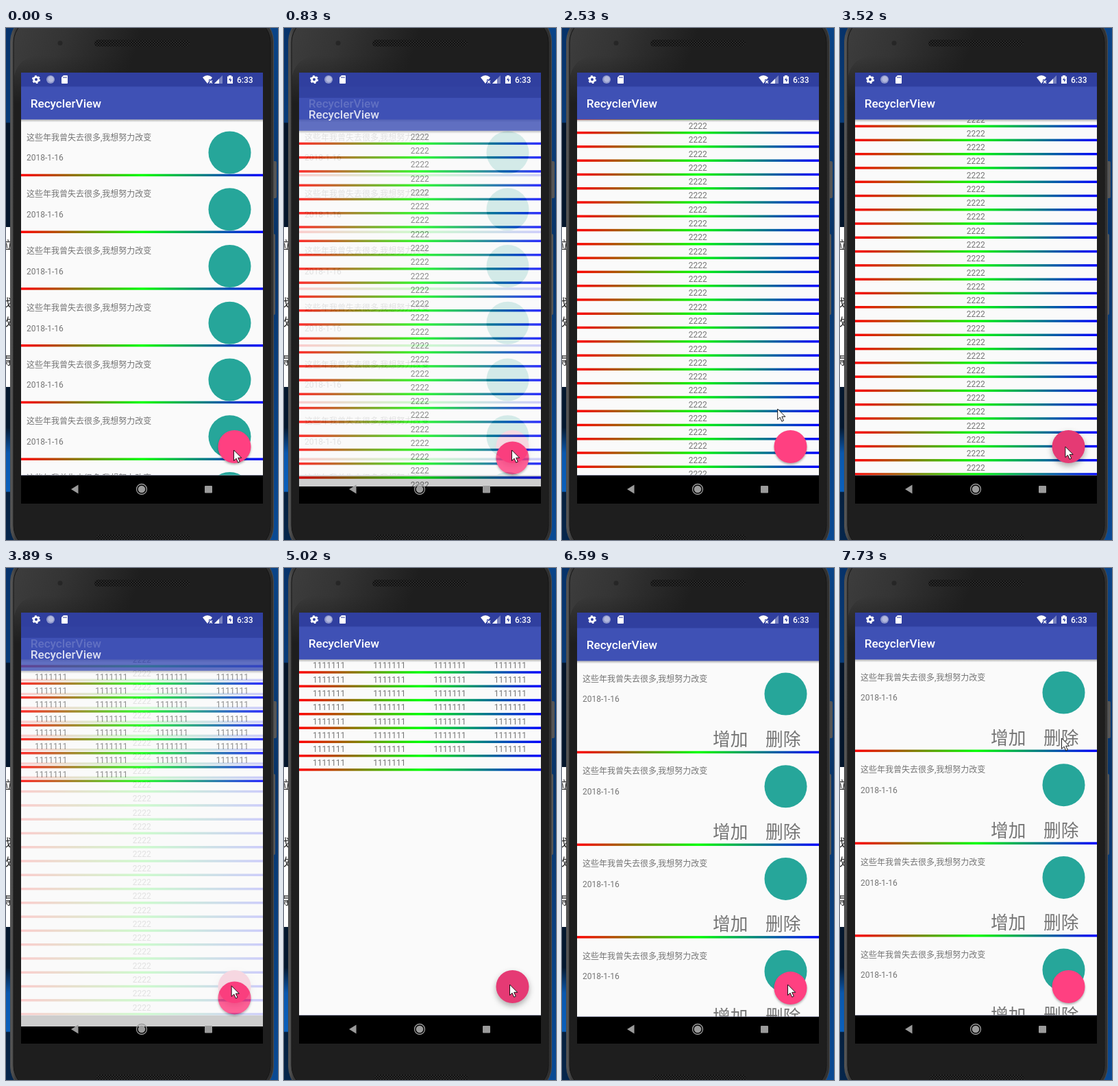
Write an HTML page that moves like this. It is 397 px wide and 746 px high and loops after 8000 ms.

```html
<!DOCTYPE html>
<html lang="zh">
<head>
<meta charset="utf-8">
<title>RecyclerView</title>
<style>
html, body { margin: 0; width: 100%; height: 100%; overflow: hidden; background: #06182e; }
svg { display: block; width: 397px; height: 746px; }
text { font-family: Roboto, "Noto Sans CJK SC", "Noto Sans CJK", sans-serif; }
.cell { font-size: 12px; fill: #757575; }
.big { font-size: 25.7px; fill: #757575; }
.mid { text-anchor: middle; }
</style>
</head>
<body>
<svg viewBox="0 0 397 746" xmlns="http://www.w3.org/2000/svg">
  <defs>
    <linearGradient id="rainbow" gradientUnits="userSpaceOnUse" x1="22" x2="375" y1="0" y2="0">
      <stop offset="0" stop-color="#f00"/><stop offset=".5" stop-color="#0f0"/><stop offset="1" stop-color="#00f"/>
    </linearGradient>
    <linearGradient id="shade" x1="0" x2="0" y1="0" y2="1">
      <stop offset="0" stop-opacity=".28"/><stop offset="1" stop-opacity="0"/>
    </linearGradient>
    <linearGradient id="deskLeft" x1="0" x2="0" y1="0" y2="1">
      <stop offset="0" stop-color="#06326a"/><stop offset=".184" stop-color="#083c7a"/>
      <stop offset=".186" stop-color="#04152a"/><stop offset=".78" stop-color="#04182f"/>
      <stop offset=".83" stop-color="#0a58ae"/><stop offset=".905" stop-color="#0a60bc"/>
      <stop offset=".907" stop-color="#05203f"/><stop offset="1" stop-color="#06264c"/>
    </linearGradient>
    <linearGradient id="deskRight" x1="0" x2="0" y1="0" y2="1">
      <stop offset="0" stop-color="#0a4488"/><stop offset=".4" stop-color="#083468"/>
      <stop offset="1" stop-color="#0a4a94"/>
    </linearGradient>
    <linearGradient id="rim" x1="0" x2="1" y1="0" y2="0">
      <stop offset="0" stop-color="#5a5a5a"/><stop offset=".02" stop-color="#3a3a3a"/>
      <stop offset="1" stop-color="#303030"/>
    </linearGradient>
    <linearGradient id="body" gradientUnits="userSpaceOnUse" x1="12" y1="0" x2="180" y2="60">
      <stop offset="0" stop-color="#3d3d3d"/><stop offset=".4" stop-color="#343434"/>
      <stop offset="1" stop-color="#1e1e1e"/>
    </linearGradient>
    <linearGradient id="fade" gradientUnits="userSpaceOnUse" x1="0" y1="40" x2="0" y2="110">
      <stop offset="0" stop-color="#1e1e1e" stop-opacity="0"/><stop offset="1" stop-color="#1e1e1e"/>
    </linearGradient>
    <pattern id="mesh" width="4" height="4" patternUnits="userSpaceOnUse">
      <rect width="4" height="4" fill="#111"/><path d="M0 0h2v2h-2zM2 2h2v2h-2z" fill="#292929"/>
    </pattern>
    <clipPath id="screen"><rect x="22" y="65" width="353" height="628"/></clipPath>
    <clipPath id="list"><rect x="22" y="133.4" width="353" height="518.2"/></clipPath>
  </defs>

  <rect width="200" height="746" fill="url(#deskLeft)"/>
  <rect x="200" width="197" height="746" fill="url(#deskRight)"/>
  <rect y="290" width="12" height="233" fill="#fff"/>
  <g font-size="16" text-anchor="end" fill="#222">
    <text x="9" y="322">位</text><text x="9" y="406">找</text>
    <text x="9" y="434">改</text><text x="9" y="490">得</text>
  </g>
  <g fill="#555">
    <rect x="389" y="194" width="6" height="54" rx="2"/>
    <rect x="389" y="300" width="4" height="118" rx="2"/>
  </g>
  <rect x="6.5" y="-20" width="384" height="786" rx="40" fill="url(#rim)" stroke="#4c4c4c"/>
  <rect x="11" y="-15" width="375" height="776" rx="36" fill="url(#body)" stroke="#151515"/>
  <rect x="11.500" y="40" width="374" height="720" rx="36" fill="url(#fade)"/>
  <circle cx="79" cy="22" r="3.5" fill="#262626"/>
  <rect x="129" y="17" width="139" height="10" rx="5" fill="url(#mesh)"/>
  <rect x="131" y="738" width="138" height="12" rx="5" fill="url(#mesh)"/>

  <g clip-path="url(#screen)">
    <rect x="22" y="65" width="353" height="628"/>
    <g id="windows"></g>
    <g fill="#fff">
      <circle cx="44" cy="75" r="3.4" fill="none" stroke="#fff" stroke-width="2.800"/>
      <circle cx="44" cy="75" r="5.200" fill="none" stroke="#fff" stroke-width="1.800" stroke-dasharray="2.72 2.72"/>
      <circle cx="65" cy="75" r="6" fill="#8f98cc"/>
      <circle cx="65.500" cy="74.500" r="4.200" fill="#b3b9dd"/>
      <path d="M84 69h5q1 0 1 1v10q0 1-1 1h-7q-1 0-1-1v-8z"/>
      <path d="M84 71v2M86 71v2M88 71v2" stroke="#303f9f"/>
      <path d="M287 72q7-6 14 0l-2 3h-3v3l-2 3z"/>
      <path d="M297 76.500l4 4m0-4l-4 4" stroke="#fff" stroke-width="1.300"/>
      <path d="M304 81l12-12v12z" opacity=".35"/>
      <path d="M304 81l7-7v7z"/>
      <path d="M325 69h4v1.500h2v10.500h-8v-10.500h2z"/>
      <path d="M327.500 72l-2.500 4h2v3l2.500-4h-2z" fill="#303f9f"/>
      <text x="337" y="79.800" font-size="12" font-weight="500">6:33</text>
    </g>
    <g fill="#9b9b9b">
      <path d="M95 672l10.500-6.500v13z"/>
      <circle cx="198" cy="672" r="7.500" fill="none" stroke="#9b9b9b" stroke-width="1.300"/>
      <circle cx="198" cy="672" r="5.300"/>
      <rect x="290" y="667" width="11" height="10.500" rx="1"/>
    </g>
  </g>
  <path id="cursor" d="M0 0V15.500L3.600 12.200L6.200 18.200L8.800 17L6.200 11.300H11.200Z" fill="#fff" stroke="#000" stroke-width=".9"/>
</svg>
<script>
const LOOP = 8000, STEP = 140;
const TOP = 133.4, LINE = 3.43, ROW = 20.28;
const $ = id => document.getElementById(id);
const repeat = (n, draw) => Array.from({ length: n }, (_, i) => draw(i)).join('');
const clamp = v => Math.min(1, Math.max(0, v));
const snap = (ms, step = STEP) => Math.floor(ms / step) * step;

const label = (x, y, str, cls = 'cell') => `<text x="${x}" y="${y}" class="${cls}">${str}</text>`;
const icon = (x, y) => `<circle cx="${x}" cy="${y}" r="31" fill="#26a69a"/>`;
const divider = bottom => `<rect x="22" y="${bottom - LINE}" width="353" height="${LINE}" fill="url(#rainbow)"/>`;

const card = (y, height) =>
  label(30, y + 30.2, '这些年我曾失去很多,我想努力改变') +
  label(30, y + 59.9, '2018-1-16') + icon(326.5, y + 48.1) + divider(y + height);

const lists = [
  repeat(7, i => card(TOP + i * 82.75, 82.75)),
  repeat(30, i => label(198.3, TOP + i * ROW + 13, '2222', 'cell mid') + divider(TOP + (i + 1) * ROW)),
  repeat(30, i => label(65.7 + i % 4 * 88.25, TOP + Math.floor(i / 4) * ROW + 13, '1111111', 'cell mid')) +
    repeat(8, i => divider(TOP + (i + 1) * ROW)),
  repeat(18, i => icon(i % 2 ? 286.3 : 110, TOP + 30.7 + Math.floor(i / 2) * 61.9)),
  repeat(4, i => {
    const y = TOP + i * 134.7;
    return card(y, 134.7) + label(220, y + 123.6, '增加', 'big') + label(297, y + 123.6, '删除', 'big');
  })
];

$('windows').innerHTML = lists.map(list => `<g class="window">
  <rect x="22" y="65" width="353" height="587" fill="#303f9f"/>
  <rect x="22" y="85.400" width="353" height="49" fill="#3f51b5"/>
  <rect x="22" y="${TOP}" width="353" height="518.200" fill="#fafafa"/>
  <text x="35.700" y="116" font-size="17.18" font-weight="500" fill="#fff">RecyclerView</text>
  <g clip-path="url(#list)"><g class="list">${list}</g></g>
  <rect x="22" y="${TOP}" width="353" height="4" fill="url(#shade)"/>
  <circle class="fab" cx="333.500" cy="610" r="24" fill="#ff4081"/>
  <circle class="ripple" cx="333.500" cy="610" r="0" opacity=".1"/>
</g>`).join('').replaceAll('height="587"', 'height="586.6"');

const screens = [...document.querySelectorAll('.window')].map(el => ({
  el,
  list: el.querySelector('.list'),
  fab: el.querySelector('.fab'),
  ripple: el.querySelector('.ripple')
}));

// One tap per screen opens the next; lead is how far the entry has run when it is first seen.
const taps = [
  { down: 560, open: 830, lead: 70 },
  { down: 3370, open: 3760, lead: 70 },
  { down: 4900, open: 5320, lead: 140 },
  { down: 6280, open: 6430, lead: 15 }
];

// Key points of the pointer: time, x, y.
const path = [
  [1300, 332.5, 615], [1680, 317.5, 619], [2380, 313, 565], [2800, 318, 535],
  [3070, 328.5, 612], [4160, 329.5, 607], [6870, 329.5, 607], [7310, 311, 390], [7730, 323.5, 248]
];

function entry(tap, t) {
  if (!tap) return { offset: 0, opacity: 1 };
  const ms = tap.lead + snap(t - tap.open, 150);
  return {
    offset: 50 * (1 - clamp(ms / 350)) ** 5,
    opacity: 1 - (1 - clamp(ms / 200)) ** 4
  };
}

function pressLevel(tap, t) {
  return tap && t >= tap.down ? Math.min(1, .4 + .6 * Math.floor((t - tap.down) / 120)) : 0;
}

function swipe(t, from, to) {
  const p = clamp(snap(t - from) / (to - from));
  return p * p * (3 - 2 * p);
}

function pointer(t) {
  const next = path.findIndex(key => key[0] > t);
  if (next < 1) return path.at(next).slice(1);
  const [from, x0, y0] = path[next - 1], [to, x1, y1] = path[next];
  const p = snap(t - from) / (to - from);
  return [x0 + (x1 - x0) * p, y0 + (y1 - y0) * p];
}

function render(t) {
  const top = taps.filter(tap => t >= tap.open).length;
  const enter = entry(taps[top - 1], t);

  screens.forEach((s, i) => {
    const { offset, opacity } = i === top ? enter : { offset: 0, opacity: 1 };
    const level = pressLevel(taps[i], t);
    const under = i === top - 1 && enter.offset > 0;
    s.el.style.display = i === top || under ? '' : 'none';
    s.el.setAttribute('transform', `translate(0 ${offset})`);
    s.el.setAttribute('opacity', opacity);
    s.ripple.setAttribute('r', 24 * level);
    s.fab.style.filter = level
      ? 'drop-shadow(0 4px 4px rgba(0,0,0,.32))'
      : 'drop-shadow(0 2px 1.5px rgba(0,0,0,.3))';
  });

  const scroll = 54 * swipe(t, 1690, 2380) + 36 * swipe(t, 2390, 2920);
  screens[1].list.setAttribute('transform', `translate(0 ${-scroll})`);
  $('cursor').setAttribute('transform', `translate(${pointer(t)})`);
}

const start = performance.now();
function tick() {
  render((performance.now() - start) % LOOP);
  requestAnimationFrame(tick);
}
tick();
</script>
</body>
</html>
```
